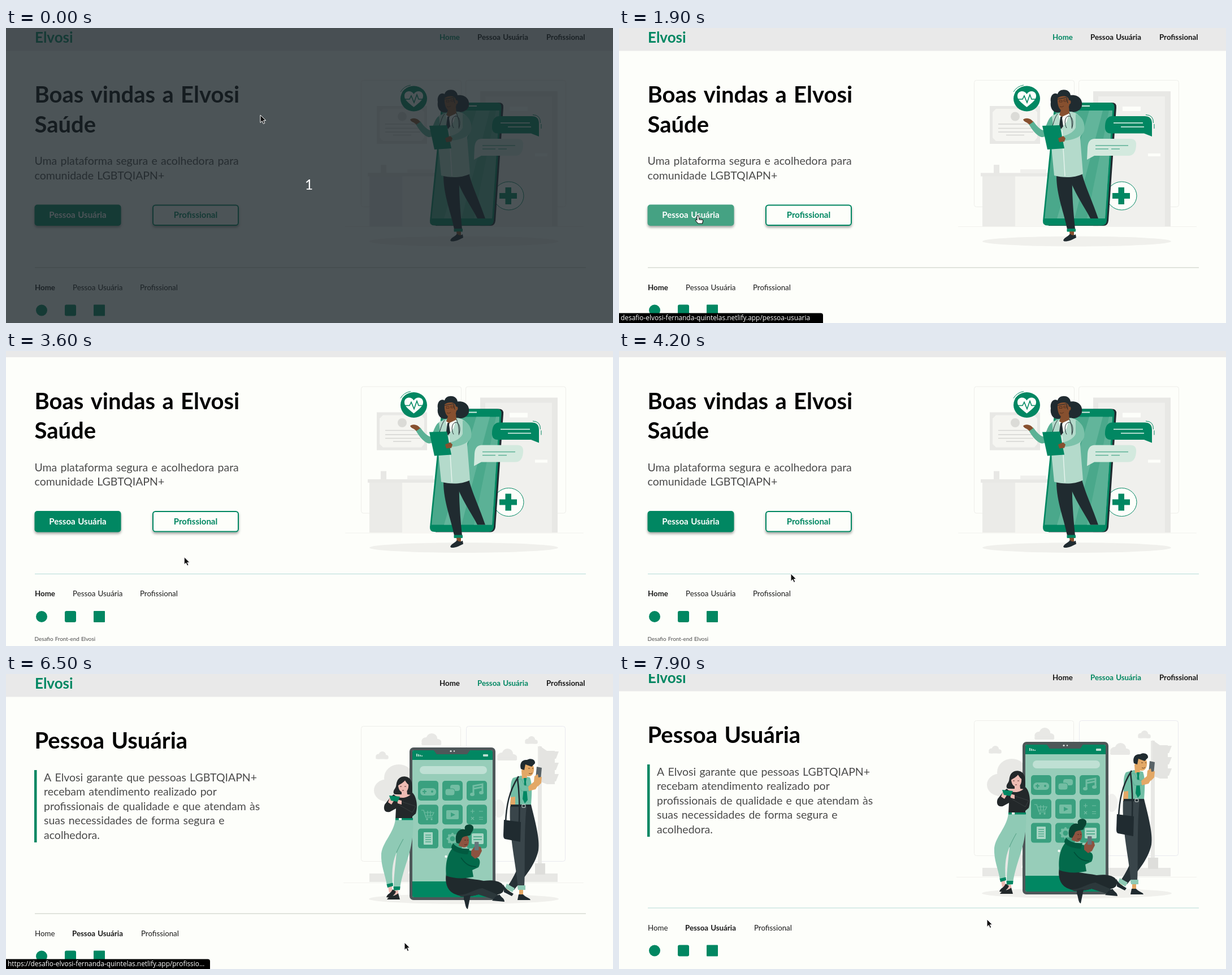
An HTML page with a canvas that plays this animation: 1074x522 px, repeating every 8000 ms.

```html
<!DOCTYPE html>
<html lang="pt-BR">
<head>
<meta charset="utf-8">
<title>Elvosi</title>
<style>
html, body { margin: 0; width: 100%; height: 100%; overflow: hidden; background: #fdfefa; }
canvas { display: block; width: 100vw; height: 100vh; }
</style>
</head>
<body>
<canvas id="stage" width="1074" height="522"></canvas>
<script>
const ctx = document.getElementById('stage').getContext('2d');
const LOOP = 8000, STEP = 100;
const BG = '#fdfefa', GREEN = '#018762', INK = '#202b30', GREY = '#e8e8e5', PALE = '#f0f0ed';
const SANS = 'Lato, sans-serif';

// ---------- drawing helpers ----------
function path(d, fill, stroke, width = 1) {
  const p = new Path2D(d);
  if (fill) { ctx.fillStyle = fill; ctx.fill(p); }
  if (stroke) { ctx.strokeStyle = stroke; ctx.lineWidth = width; ctx.stroke(p); }
}
function box(x, y, w, h, fill, r = 0, stroke, width = 1) {
  ctx.beginPath();
  ctx.roundRect(x, y, w, h, r);
  if (fill) { ctx.fillStyle = fill; ctx.fill(); }
  if (stroke) { ctx.strokeStyle = stroke; ctx.lineWidth = width; ctx.stroke(); }
}
function oval(x, y, rx, ry, fill, stroke, width = 1) {
  ctx.beginPath();
  ctx.ellipse(x, y, rx, ry, 0, 0, Math.PI * 2);
  if (fill) { ctx.fillStyle = fill; ctx.fill(); }
  if (stroke) { ctx.strokeStyle = stroke; ctx.lineWidth = width; ctx.stroke(); }
}
function text(str, x, y, size, color, weight = 400, align = 'left', family = SANS) {
  ctx.font = `${weight} ${size}px ${family}`;
  ctx.wordSpacing = `${size * .065}px`;
  ctx.textAlign = align;
  ctx.fillStyle = color;
  ctx.fillText(str, x, y);
}
function cloud(x, y, s) {
  oval(x - 6 * s, y, 6 * s, 5 * s, GREY);
  oval(x + 1 * s, y - 3 * s, 7 * s, 7 * s, GREY);
  oval(x + 8 * s, y + 1 * s, 5 * s, 4 * s, GREY);
  box(x - 12 * s, y + 1 * s, 25 * s, 4 * s, GREY, 2 * s);
}

// ---------- home illustration ----------
function drawDoctor() {
  box(628.5, 92.5, 177, 224, null, 4, '#eeeeea');
  box(813.5, 92.5, 177, 224, null, 4, '#eeeeea');
  drawOffice();
  drawPhone();
  drawWoman();
  drawBadge();
  drawBubbles();
}
function drawOffice() {
  box(656, 138, 89, 67, GREY);
  path('M667 143H735L740 149V194L735 200H667L661 194V149Z', '#f5f5f1');
  oval(701, 156.5, 8, 8, '#dbdbd7');
  for (const y of [170, 177.5, 184]) path(`M671 ${y}H733`, null, '#d5d5d2', 1.5);
  path('M685 189.5H717', null, '#d5d5d2', 1.5);

  box(839, 112, 137, 239, GREY);
  box(848, 121, 118, 230, PALE);
  box(891, 139, 32, 8, BG);
  box(936, 222, 22, 5, BG);

  box(643, 262, 58, 89, '#ebebe8');
  box(701, 262, 54, 89, '#f6f6f2');
  box(640, 256.5, 120, 6, GREY);
  box(663, 242, 10, 15, GREY);
  box(710, 250, 46, 7, PALE);
  path('M600 351.5H1022', null, '#f2f2ee');
  oval(810, 377.5, 167, 9, '#f0f0ec');
}
function drawPhone() {
  oval(889.5, 297, 26.5, 25, BG, GREEN);
  path('M883.5 282H894V292H904V302H894V312H883.5V302H873V292H883.5Z', GREEN);
  path('M783 132H872Q881 132 880 141L866 341Q865 350 857 350H760Z', INK);
  path('M779 132H869Q877 132 876.5 141L863 341Q862 349.5 854 349.5H758Q749.5 349.5 750 341L770 141Q771 132 779 132Z', GREEN);
  path('M773 146H873L860 337H753Z', '#4aa88b');
  path('M832 146H856L806 337H775Z', '#62b59b');
  path('M867 146H873L860 337H828Z', '#5bb196');
  path('M819 138H833', null, '#d9eee5', 2);
}
function drawWoman() {
  const skin = '#87502f';
  path('M764 131C762 119 770 113 776 117C778 107 797 106 799 119C812 117 821 126 819 137C817 148 804 151 796 147L780 149C769 152 762 142 764 131Z', INK);

  // legs
  path('M795 260L819 257C824 278 839 310 848 337H834C823 315 804 290 795 260Z', INK);
  path('M774 261L802 260C801 292 804 326 807 356H793C788 328 774 297 774 261Z', INK);
  box(792.5, 355, 15.5, 5.5, GREEN, 1);
  path('M797 360H805V368H798Z', skin);
  path('M786 376C788 370 795 369 798 364C802 368 805 367 808 365L809 371C801 375 795 378 788 377.5Z', INK);

  // coat and arms
  path('M776 151L800 148C812 150 822 160 823 178C823 186 815 190 816 195L821 258C805 266 785 265 770 261L764 200C758 185 760 165 766 155Z', '#b4dacb');
  path('M766 156C758 160 756 178 750 181C743 178 738 172 733 165L725 170C731 181 742 194 750 193C758 192 764 182 768 172Z', '#5bb195');
  path('M733 166L726 171C722 166 717 167 715 162C720 158 728 159 733 166Z', skin);
  path('M778 154L797 150L792 166L783 178Z', '#f6faf5');
  path('M781 157L785 156L784 160L786 174L782 179L779 172Z', INK);
  path('M783 142L796 140L797 151L784 157L779 154Z', skin);
  path('M776 124C784 118 796 120 796 128C800 126 801 134 797 135C796 143 791 147 786 147C779 146 775 136 776 124Z', skin);
  path('M775 126L792 123L794 133', null, INK, 1);
  path('M779 128H784V131H779ZM787 127H792V130H787ZM780 139Q784 141 787 138', null, '#4a2b1c', .8);
  path('M776 152C771 158 770 165 767 173M797 150C801 160 802 170 801 176', null, INK, 1);
  path('M792 177C787 169 789 157 795 156C803 155 805 169 801 178', null, INK, 1);
  path('M784 180L789 262', null, '#e5f3ec', 1.5);
  path('M808 152C822 157 825 172 823 182C818 194 800 199 788 199L787 191C798 188 806 182 808 176Z', '#7cc2aa');
  path('M749 173L780 172L788 213L758 215Z', GREEN);
  path('M777 195L786 191L790 195L788 201L779 202Z', skin);
}
function drawBadge() {
  oval(721.5, 125, 23.5, 22.5, GREEN);
  path('M721.5 140C712 132 704 127 705 119C706 111 717 109 721.5 117C726 109 737 111 738 119C739 127 731 132 721.5 140Z', BG);
  path('M706 126H714L717 120L722 132L727 118L730 126H738', null, GREEN, 1.6);
  path('M698 113Q704 103 716 101M701 114Q707 106 714 105', null, GREEN);
}
function drawBubbles() {
  path('M873 156H930Q943 156 943 169V192L929 186.5H870Q859 186.5 860 173Q861 156 873 156Z', GREEN);
  path('M875 168H927M888 175H929', null, '#edf7f1', 1.6);
  path('M932 153.5Q946 154 945.5 168M947 170V178', null, GREEN);
  path('M842 196H905Q916 196 915 208Q914 226 901 226H841L828 233L829 211Q830 196 842 196Z', '#d3e9de');
  path('M843 208H901M843 214H866M871 214H886', null, '#5bb195', 1.5);
}

// ---------- user page illustration ----------
function drawPeople() {
  box(628.5, 92.5, 176, 239, null, 4, '#eeeeea');
  box(814.5, 92.5, 175, 239, null, 4, '#e9e9ef');
  drawStreet();
  drawTablet();
  drawReader();
  drawSitter();
  drawMan();
}
function drawStreet() {
  cloud(665, 146, .9);
  cloud(752, 119, 1.4);
  cloud(886, 146, 1.4);
  cloud(929, 119, .9);
  oval(695, 184, 26, 24, GREY);
  oval(675, 206, 24, 20, GREY);
  oval(710, 212, 24, 22, GREY);
  oval(697, 340, 18, 22, GREY);
  oval(872, 238, 10, 16, PALE);
  box(643, 353, 333, 15, GREY);
  box(941, 128, 7, 225, GREY);
  path('M944 127L957 136H971V195H957L944 190Z', '#e4e4e1');
  for (let i = 0; i < 3; i++) path(`M970 ${137 + i * 20}H978L973 ${150 + i * 20}H970Z`, '#e4e4e1');
  box(936, 335, 18, 20, '#dededb');
  path('M597 369.5H1022', null, '#f2f2ee');
  oval(810, 398, 168, 9, '#f0f0ec');
}
function drawTablet() {
  box(714, 130, 152, 270, '#4e5759', 7);
  box(719, 135, 142, 260, '#97cdb9', 3);
  box(719, 135, 142, 17, GREEN, [3, 3, 0, 0]);
  path('M757 135H821L816 142H762Z', '#4e5759');
  oval(787, 136.5, 1.6, 1.6, '#dfe6e4');
  oval(793, 136.5, 1.2, 1.2, '#dfe6e4');
  for (let i = 0; i < 4; i++) box(726 + i * 3, 141 + i, 1.8, 5 - i, '#b9ddd0');
  box(844, 142, 9, 4, '#b9ddd0', 1);
  box(719, 367, 142, 28, GREEN, [0, 0, 3, 3]);
  box(732, 163, 119, 14, '#bfe0d4', 7);
  for (let i = 0; i < 9; i++) box(729 + i % 3 * 43, 189 + Math.floor(i / 3) * 42.3, 36, 35, '#3aa07f', 5);
  drawGlyphs('#73bda3');
  oval(778.5, 323, 2.2, 2.2, '#f5faf5');
  oval(788, 323, 2, 2, '#bfe0d4');
}
function drawGlyphs(c) {
  const tile = '#3aa07f';
  box(733, 202, 28, 13, c, 6);
  path('M737 208H744M740.5 204.5V212', null, tile, 2);
  oval(754, 208, 2, 2, tile);
  box(786, 196, 17, 11, c, 4);
  box(777, 203, 17, 12, c, 4, tile);
  path('M827 213V198L843 195V210M827 203L843 200', null, c, 3);
  oval(825, 213, 4, 3, c);
  oval(841, 210, 4, 3, c);
  path('M735 241H739L743 254H755M741 245H757L754 251H742M746 242V252M751 242V252', null, c, 1.2);
  oval(745, 257, 1.7, 1.7, c);
  oval(753, 257, 1.7, 1.7, c);
  box(779, 241, 22, 16, c, 2);
  path('M787 245L795 249L787 253Z', tile);
  path('M822 243H829M825.5 239.5V246.5M837 243H844M823 253L828 258M828 253L823 258M837 253.5H844M837 257H844', null, c, 1.1);
  box(739, 280, 16, 22, '#a9d6c5', 1);
  for (let y = 285; y < 300; y += 4) path(`M742 ${y}H752`, null, tile, 1.2);
  oval(790, 291.5, 6.5, 6.5, null, c, 4);
  for (let i = 0; i < 8; i++) {
    const a = i * Math.PI / 4;
    oval(790 + 8.5 * Math.cos(a), 291.5 + 8.5 * Math.sin(a), 2, 2, c);
  }
  box(824, 282, 21, 19, '#a9d6c5', 2);
  path('M827 288H842M827 293H842', null, tile, 1.3);
}
function drawReader() {
  const skin = '#eebbb3', top = '#23282a', leg = '#8fcab5';
  // trousers and shoes
  path('M676 376L683 374V385L678 387ZM687 383H694V391H687Z', skin);
  path('M689 257H720C722 292 714 318 706 342C701 358 698 370 697 380L686 378C686 358 689 338 691 316C682 336 683 356 684 372L674 374C671 354 663 340 664 318C667 296 686 282 689 257Z', leg);
  path('M703 292C698 301 694 308 691 316', null, '#5fa98f', 1.2);
  path('M673.5 372L684.5 369.5L685 375L675 378Z', GREEN);
  path('M685.5 376H697.5L697 382L686 383Z', GREEN);
  path('M673 395C675 388 681 389 684 381L690 385C687 392 681 397 673 395ZM674 399C678 392 687 394 694 388L697 399Z', top);

  // hair behind, neck and face
  path('M692 190C696 178 715 178 718 192C719 202 719 208 718 215L708 214L691 213C685 214 684 208 688 203C691 199 690 195 692 190Z', top);
  path('M700 205L709 203L710 213L718 214L712 221H694L688 214L700 213Z', skin);
  path('M694 193C697 187 710 186 712 194C713 203 710 209 704 210C697 210 693 202 694 193Z', skin);
  path('M693 198C693 182 714 179 715 197C711 196 708 192 706 188C703 193 698 194 693 198Z', top);
  path('M697 199H700M705 199H708M701 206H704', null, '#5a3330', 1);

  // jumper, arms and handset
  path('M686 213C695 222 711 221 719 210C727 217 729 236 725 247L719 252V257H689L690 238L679 244C670 246 667 239 670 231L681 217Z', top);
  path('M725 234L700 226L696 232L719 245Z', top, '#3e4446', .8);
  path('M679 219L687 223L682 231L676 227ZM692 222L700 224L700 231L693 229Z', skin);
  path('M678 215L697 217L693 226L681 224Z', GREEN);
  box(689, 255, 31, 3.5, GREEN);
  box(695, 255, 5, 3.5, BG);
}
function drawSitter() {
  const skin = '#8d5340', pants = '#202a2d';
  path('M779 353C802 361 825 362 845 366C873 362 887 373 879 386C870 394 850 391 836 390C817 396 798 394 787 385C778 377 777 363 779 353Z', pants);
  path('M800 391C816 392 827 381 843 379L871 391L866 400L836 390C826 393 816 395 805 394Z', '#2c383b');
  path('M866 394L873 390C877 396 882 397 882 403L860 401Z', INK);
  path('M810 393L822 391L817 416C812 414 813 404 810 399Z', INK);

  path('M793 305C803 311 815 310 823 313L830 325C838 324 841 332 836 342L825 347L827 359C810 363 792 362 779 357C777 338 780 317 793 305Z', '#036a4b');
  path('M805 325C812 335 819 341 832 341', null, '#014f39', 1.5);
  path('M791 299C796 308 810 310 820 309L817 319C805 319 788 314 788 306Z', '#025a40');
  path('M802 287C808 281 819 284 819 293C820 302 816 307 810 307L801 304Z', skin);
  path('M797 299C792 282 803 272 812 275C809 264 827 264 827 272C827 279 822 281 822 285C814 288 807 286 806 293L802 300Z', '#0a4433');
  path('M811 294H814M816 294H818M811 302Q814 303 816 301', null, '#4b2920', 1);
  path('M823 313L830 304L840 306L842 313L837 323L830 327L823 321Z', skin);
  box(829, 297, 7.5, 15, '#65757a', 1);
}
function drawMan() {
  const skin = '#e3a866', shirt = '#72bea5', pants = '#39454a';
  // legs and shoes
  path('M908 233L929 231C936 260 945 292 942 312C936 340 915 362 899 382L888 375C905 350 914 325 913 303Z', '#263136');
  path('M892 233H921C916 282 919 335 917 380L906 381C903 337 889 286 892 233Z', pants);
  path('M886 371L900 379L896 386L883 379ZM905 374H919V382H906Z', '#8fcab5');
  path('M885 380L891 384L888 389L883 384ZM908 382H915V391H908Z', skin);
  path('M880 372C884 382 891 384 898 389L895 393L881 386ZM905 400L907 390H915C920 396 927 396 928 400Z', INK);

  // body and head
  path('M911 180L927 183C932 197 930 215 929 232H892C895 213 890 194 897 184Z', shirt);
  path('M893 218L901 217L901 234H892Z', skin);
  path('M912 170L921 173L922 184L913 185Z', skin);
  path('M913 160C917 155 933 156 934 166C935 176 930 182 924 181C914 180 911 170 913 160Z', skin);
  path('M911 168C908 158 913 151 922 152C928 148 937 151 936 158L930 164L919 160L917 170Z', INK);
  path('M924 167H927M931 167H933M925 176Q929 178 931 175', null, '#6a4320', 1);
  path('M916 184L921 184L920 191L923 223L918 229L914 221L917 191Z', GREEN);

  // raised forearm with handset
  path('M903 187L912 207L925 207L928 199L917 197L912 186Z', shirt, '#56a98f', .8);
  path('M924 199L935 190L942 196L937 204L925 207Z', skin);
  path('M939 164L948 166L946 187L937 185Z', '#596367');
  path('M934 191L935 181L941 177L942 183L948 182L947 193L941 199Z', skin);

  // bag
  path('M907 181C890 207 885 234 884 264M905 184C909 215 909 239 908 264', null, INK, 2.5);
  path('M881 258L911 262L910 297L883 292Q880 291 880 285Z', INK);
  box(893, 231, 36, 4, INK);
  box(913, 231, 6, 5, INK, 1, '#e7eeea', 1);
}

// ---------- page ----------
const LINKS = ['Home', 'Pessoa Usuária', 'Profissional'];
const NAV_X = [767, 834, 956];
const FOOT_X = [[51, 118, 237], [51, 117, 239]];
const BUTTONS = [[50.5, 312.5], [259, 312.5]];
const INTRO = ['Uma plataforma segura e acolhedora para', 'comunidade LGBTQIAPN+'];
const QUOTE = [
  'A Elvosi garante que pessoas LGBTQIAPN+', 'recebam atendimento realizado por',
  'profissionais de qualidade e que atendam às', 'suas necessidades de forma segura e', 'acolhedora.'
];

const inside = (p, x, y, w, h) => p.x >= x && p.x <= x + w && p.y >= y && p.y <= y + h;

function findHover(page, p) {
  if (!page) {
    const i = BUTTONS.findIndex(([x, y]) => inside(p, x, y, 153, 38));
    if (i >= 0) return { kind: 'button', i };
  }
  const i = FOOT_X[page].findIndex((x, k) => inside(p, x, 450, [35, 88, 67][k], 17));
  return i >= 0 ? { kind: 'link', i } : null;
}

function drawButton(i, hot) {
  const [x, y] = BUTTONS[i], color = hot ? '#45a283' : GREEN;
  ctx.shadowColor = 'rgba(0,0,0,.35)';
  ctx.shadowBlur = 4;
  ctx.shadowOffsetY = 3;
  box(x, y, 153, 37.5, i ? BG : color, 5);
  ctx.shadowColor = 'transparent';
  if (i) box(x + 1, y + 1, 151, 35.5, null, 4.5, color, 2);
  text(LINKS[i + 1], x + 76.5, 336, 15, i ? color : '#fff', 700, 'center');
}

function drawPage(page, scroll, hover) {
  const isHot = (kind, i) => hover && hover.kind === kind && hover.i === i;
  ctx.save();
  ctx.translate(0, -scroll);
  box(0, 0, 1074, 40.5, '#e9e9e9');
  text('Elvosi', 51, 26, 26, GREEN, 700);
  LINKS.forEach((s, i) => text(s, NAV_X[i], 21, 13.3, i === page ? GREEN : '#161616', 700));

  if (page) {
    text('Pessoa Usuária', 50.5, 132, 40, '#000', 700);
    box(50, 170, 4.5, 128, GREEN);
    QUOTE.forEach((s, i) => text(s, 67, 189.5 + i * 25.5, 19.5, '#4b4b4b'));
    drawPeople();
  } else {
    text('Boas vindas a Elvosi', 50.5, 132, 40, '#000', 700);
    text('Saúde', 50.5, 184.5, 40, '#000', 700);
    INTRO.forEach((s, i) => text(s, 50.5, 242 + i * 25.5, 19.5, '#4b4b4b'));
    BUTTONS.forEach((b, i) => drawButton(i, isHot('button', i)));
    drawDoctor();
  }

  box(51, 423.5, 975, 1, scroll ? '#b5dbd8' : '#c6ccc2');
  LINKS.forEach((s, i) =>
    text(s, FOOT_X[page][i], 463.5, 13.3, isHot('link', i) ? '#6b6b6b' : '#1a1a1a', i === page ? 700 : 400));
  oval(63, 499.5, 10, 10, GREEN);
  box(104, 489.5, 20, 20, GREEN, 3);
  box(155, 489.5, 20, 20, GREEN, 1);
  text('Desafio Front-end Elvosi', 50.5, 542.5, 9.9, '#4b4b4b');
  ctx.restore();
}

// ---------- pointer and status bar ----------
function drawPointer({ x, y }, hand) {
  ctx.save();
  ctx.translate(x, y);
  ctx.lineJoin = 'round';
  if (hand) {
    path('M-2 1Q0-1 1.5 1V6L7 7Q9 7.5 8.5 10L7.5 14H0L-4.5 9Q-5 7-3 7L-2 8Z', '#fff', '#111', 1.1);
    path('M2 6V8.5M5 7V9', null, '#111', .8);
  } else {
    path('M0 0V13.5L3.2 10.6L5.4 15.5L7.8 14.4L5.6 9.7H9.8Z', '#111', '#fff', 1);
  }
  ctx.restore();
}

const SITE = 'desafio-elvosi-fernanda-quintelas.netlify.app/';
const STATUS = [
  [1500, 2200, SITE + 'pessoa-usuaria'],
  [2800, 3300, SITE + 'profissional'],
  [5600, 5900, SITE + 'pessoa-usuaria'],
  [6100, 6700, 'https://' + SITE + 'profissio…']
];
function drawStatus(t) {
  for (const [from, to, label] of STATUS) {
    const alpha = Math.min(1, (t - from) / 200, (to + 200 - t) / 200);
    if (alpha <= 0) continue;
    box(0, 504.5, 361, 18, `rgba(0,0,0,${alpha})`, [0, 4, 0, 0]);
    text(label, 3, 517, 11.9, `rgba(255,255,255,${Math.min(1, alpha + .3)})`, 400, 'left', '"Open Sans", sans-serif');
  }
}

// ---------- timeline ----------
const POINTER = [
  [0, 450, 154], [300, 450, 154], [1100, 176, 301], [1400, 138, 329], [1900, 140, 332],
  [2100, 205, 360], [2400, 300, 362], [2600, 322, 346], [2800, 333, 331], [3100, 333, 331],
  [4000, 302.5, 388.5], [4200, 304, 394], [4600, 304, 394], [5400, 190, 454], [5700, 187, 456],
  [5900, 187, 456], [6100, 266, 458], [6300, 286, 459], [6500, 705, 475], [7000, 651, 434]
];
const SCROLL = [[3200, 0], [3600, 29.5], [4500, 29.5], [4900, 0], [7100, 0], [7500, 29.5], [7700, 29.5], [7900, 10]];

function track(keys, t, col) {
  const n = keys.findIndex(k => k[0] > t);
  if (n === 0) return keys[0][col];
  if (n < 0) return keys[keys.length - 1][col];
  const a = keys[n - 1], b = keys[n], u = (t - a[0]) / (b[0] - a[0]);
  return a[col] + (b[col] - a[col]) * u * u * (3 - 2 * u);
}

function render(t) {
  const page = t < 6000 ? 0 : 1;
  const scroll = track(SCROLL, t, 1);
  const p = { x: track(POINTER, t, 1), y: track(POINTER, t, 2) };
  const hover = findHover(page, { x: p.x, y: p.y + scroll });
  box(0, 0, 1074, 522, BG);
  drawPage(page, scroll, hover);
  drawStatus(t);
  if (t < 200) {
    box(0, 0, 1074, 522, 'rgba(27,36,41,.78)');
    text('1', 536, 286, 25, '#fff', 400, 'center');
  }
  drawPointer(p, hover);
}

// Motion advances in steps of a tenth of a second.
const start = performance.now();
function tick() {
  const t = Math.max(0, performance.now() - start) % LOOP;
  render(Math.floor(t / STEP) * STEP);
  requestAnimationFrame(tick);
}
tick();
</script>
</body>
</html>
```
